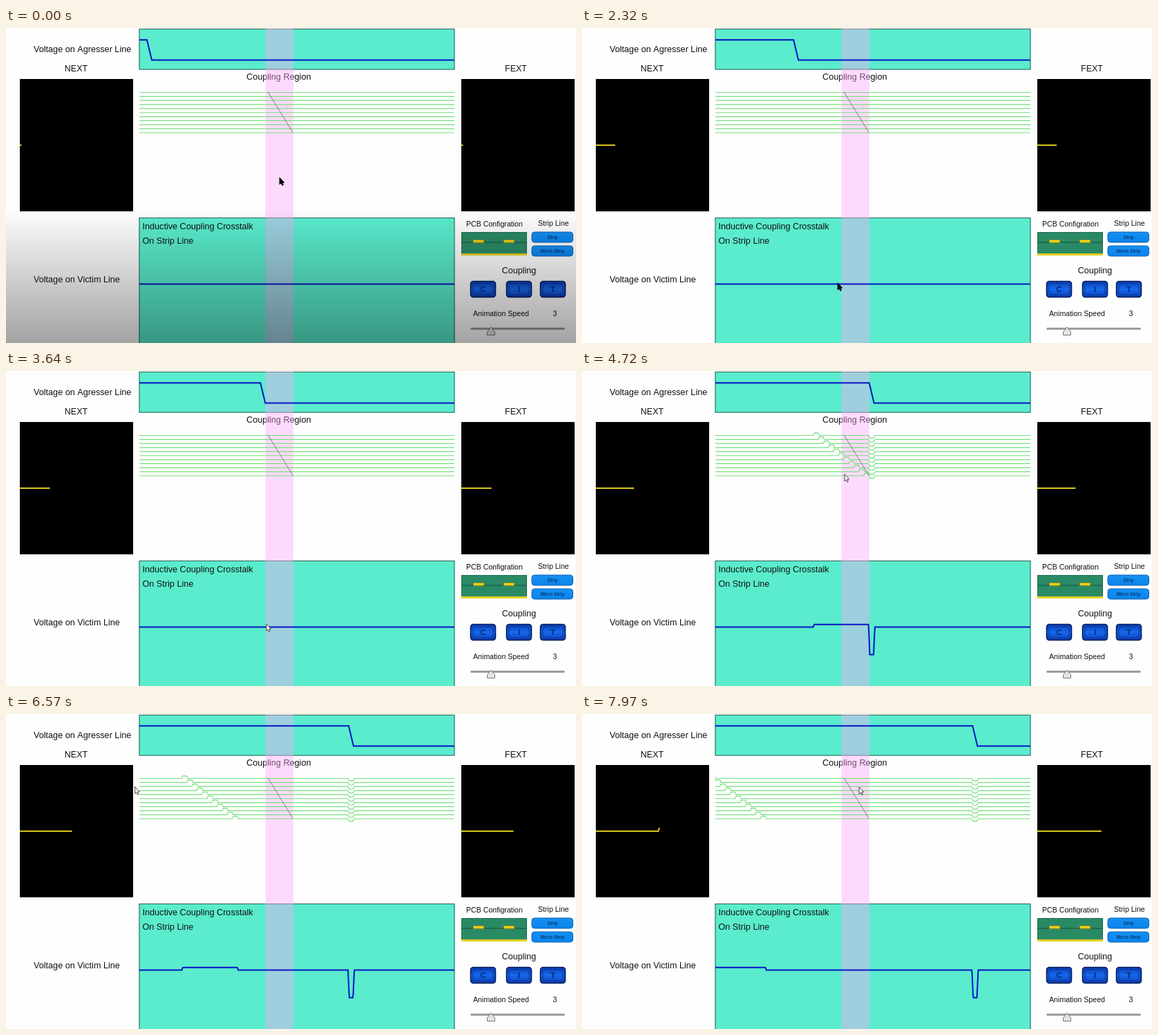
An HTML page with a canvas for the animation above (8 s loop, 825 px wide and 457 px high).

```html
<!DOCTYPE html>
<html lang="en">
<head>
<meta charset="utf-8">
<title>Inductive coupling crosstalk</title>
<style>
  html, body { margin: 0; width: 100%; height: 100%; overflow: hidden; background: #fefefe; }
  canvas { display: block; }
</style>
</head>
<body>
<canvas id="stage" width="825" height="457"></canvas>
<script>
const ctx = document.getElementById('stage').getContext('2d');
const LOOP = 8000, FRAME = 77;
const LEFT = 193, RIGHT = 649;
const STEP = 3.65;          // edge travel per step, also the height of one coupled pulse
const START = 204, RISE = 7; // edge position at step 0 and edge length
const ENTRY = 379;          // first coupling point
const LINES = 11, LINE_TOP = 93.5, LINE_GAP = 5.85;
const PANEL = '#5aeccd', BLUE = '#0a12c4';

// Each row: time in ms, then values
const STEPS = [[0, 0], [1150, 15], [2320, 29], [3640, 46], [4720, 59], [6570, 81], [6720, 81], [7960, 100], [LOOP, 100]];
const POINTER = [[0, 396, 217], [70, 396, 217], [1150, 378, 360], [2320, 370, 370], [3640, 377, 367],
  [4720, 380, 145], [6570, 184, 105], [6720, 184, 105], [7970, 408, 106], [LOOP, 408, 106]];

const clamp = v => Math.max(0, Math.min(1, v));

function tween(keys, t) {
  const i = Math.max(1, keys.findIndex(k => k[0] >= t));
  const [a, b] = [keys[i - 1], keys[i]];
  const p = clamp((t - a[0]) / (b[0] - a[0]));
  return a.slice(1).map((v, j) => v + (b[j + 1] - v) * p);
}

function rect(x, y, w, h, fill, stroke) {
  ctx.fillStyle = fill;
  ctx.fillRect(x, y, w, h);
  if (!stroke) return;
  ctx.strokeStyle = stroke;
  ctx.lineWidth = 1;
  ctx.strokeRect(x + .5, y + .5, w - 1, h - 1);
}

function pill(x, y, w, h, r, fill, stroke, width = 1) {
  ctx.beginPath();
  ctx.roundRect(x, y, w, h, r);
  ctx.fillStyle = fill;
  ctx.fill();
  ctx.strokeStyle = stroke;
  ctx.lineWidth = width;
  ctx.stroke();
}

function text(str, x, y, size = 12.65, align = 'left', color = '#111', weight = '') {
  ctx.font = `${weight} ${size}px "Liberation Sans", Arial, sans-serif`;
  ctx.textAlign = align;
  ctx.fillStyle = color;
  ctx.fillText(str, x, y);
}

function path(points, color, width, fill) {
  ctx.beginPath();
  points.forEach(([x, y]) => ctx.lineTo(x, y));
  if (fill) {
    ctx.closePath();
    ctx.fillStyle = fill;
    ctx.fill();
  }
  ctx.strokeStyle = color;
  ctx.lineWidth = width;
  ctx.stroke();
}

function plot(from, to, y, color, width) {
  const points = [];
  for (let x = from; x < to; x += .5) points.push([x, y(x)]);
  points.push([to, y(to)]);
  path(points, color, width);
}

function gradient(y0, y1, ...colors) {
  const g = ctx.createLinearGradient(0, y0, 0, y1);
  colors.forEach((c, i) => g.addColorStop(i / (colors.length - 1), c));
  return g;
}

// Trapezoid of height 1; copies 2*STEP apart add up to a flat top
const pulse = (u, slope = 1.3) => clamp(Math.min(u, 2 * STEP + slope - u) / slope);

// Voltage on the victim from coupling point i while the edge is at `edge`
function coupled(i, x, edge) {
  if (edge + RISE < ENTRY + STEP * i) return 0;
  const backward = 750.5 - edge + 2 * STEP * i;
  return STEP * (pulse(x - backward) - pulse(x - edge + 1, 1.8));
}

function victim(x, edge) {
  let sum = 0;
  for (let i = 0; i < LINES; i++) sum += coupled(i, x, edge);
  return sum;
}

function scope(x, probe, edge) {
  rect(x, 74, 164, 192, '#000');
  const atEdge = u => START + (u - x - 2.5) * 4;
  plot(x, x + 2.5 + (edge - START) / 4, u => 170 - victim(probe, atEdge(u)), '#d8c61c', 2);
}

function board() {
  rect(659, 296, 95, 34, '#2b8a66', '#1f6b50');
  rect(659, 310.5, 95, 1, '#174f3c');
  for (const x of [676, 720]) rect(x, 307, 16, 4.5, '#f2dc1e', '#a58f10');
  rect(659, 327, 95, 3, '#e3cf22');
}

function controls() {
  text('PCB Configration', 666, 287.5, 10.6);
  text('Strip Line', 770, 286.5, 10.6);
  board();
  [['Strip', 296], ['Micro Strip', 316]].forEach(([label, y]) => {
    pill(761, y, 59.5, 15, 4, gradient(y, y + 15, '#1690f4', '#0a84ea'), '#0d62b4');
    text(label, 791, y + 10, 6.6, 'center', '#083a78', 'bold');
  });
  text('Coupling', 742.5, 356, 12.5, 'center');
  [['C', 672], ['I', 724], ['T', 773]].forEach(([label, x]) => {
    pill(x + .5, 367.5, 36, 23, 4, gradient(367, 391, '#0a3cae', '#1260e0', '#0a3cae'), '#061c5c', 1.6);
    pill(x + 4, 371, 29, 16, 3, gradient(371, 387, '#0e4cc8', '#1668ec', '#0e4cc8'), '#0a3798');
    text(label, x + 18.5, 383, 11, 'center', '#06256e', 'bold');
  });
  text('Animation Speed', 676, 417.5, 10.65);
  text('3', 794.5, 417.5, 10.65, 'center');
  pill(672.5, 435, 136, 2.4, 1, '#8d8d8d', '#b4b4b4', .8);
  path([[702, 434], [707.5, 441], [707.5, 445.5], [696.5, 445.5], [696.5, 441], [702, 434]], '#777', 1, '#e4e4e4');
}

function pointer(t) {
  const [x, y] = tween(POINTER, t);
  const dark = t < 600 || (t > 1900 && t < 2800);
  const shape = [[0, 0], [0, 10], [2.2, 8], [3.8, 11.4], [5.4, 10.7], [3.9, 7.4], [6.7, 7.2], [0, 0]];
  path(shape.map(([dx, dy]) => [x + dx, y + dy]), dark ? '#000' : '#333', .9, dark ? '#000' : '#fff');
}

function draw(t) {
  const edge = START + STEP * Math.floor(tween(STEPS, t)[0] + .01);

  rect(0, 0, 825, 457, '#fefefe');
  rect(LEFT - .5, 1, RIGHT - LEFT + 1, 59.5, PANEL, '#2f5f55');
  rect(LEFT - .5, 275, RIGHT - LEFT + 1, 190, PANEL, '#2f5f55');
  text('Voltage on Agresser Line', 40, 35);
  text('Voltage on Victim Line', 40, 369);
  text('NEXT', 101.5, 63, 12.5, 'center');
  text('FEXT', 738, 63, 12.5, 'center');
  text('Coupling Region', 348, 74.5);
  text('Inductive Coupling Crosstalk', 197.5, 292);
  text('On Strip Line', 197.5, 313);
  rect(375.5, 1, 40.5, 456, 'rgba(250,167,248,.42)');

  path([[LEFT, 17.3], [edge, 17.3], [edge + RISE, 46.5], [RIGHT, 46.5]], BLUE, 2);
  for (let i = 0; i < LINES; i++) {
    const y = LINE_TOP + LINE_GAP * i;
    plot(LEFT, RIGHT, x => y - coupled(i, x, edge), '#74e07a', 1.2);
  }
  path([[379, 92.5], [415.5, 152]], '#7d6f80', .9);
  plot(LEFT, RIGHT, x => 371.4 - victim(x, edge), BLUE, 2);

  scope(20, LEFT, edge);
  scope(659, RIGHT, edge);
  controls();

  const shade = 1 - clamp((t - 70) / 300);
  if (shade) rect(0, 262, 825, 195, gradient(262, 457, 'rgba(0,0,0,0)', `rgba(0,0,0,${.36 * shade})`));
  pointer(t);
}

function tick() {
  const t = performance.now() % LOOP;
  draw(Math.floor(t / FRAME + .1) * FRAME);
  requestAnimationFrame(tick);
}
tick();
</script>
</body>
</html>
```
